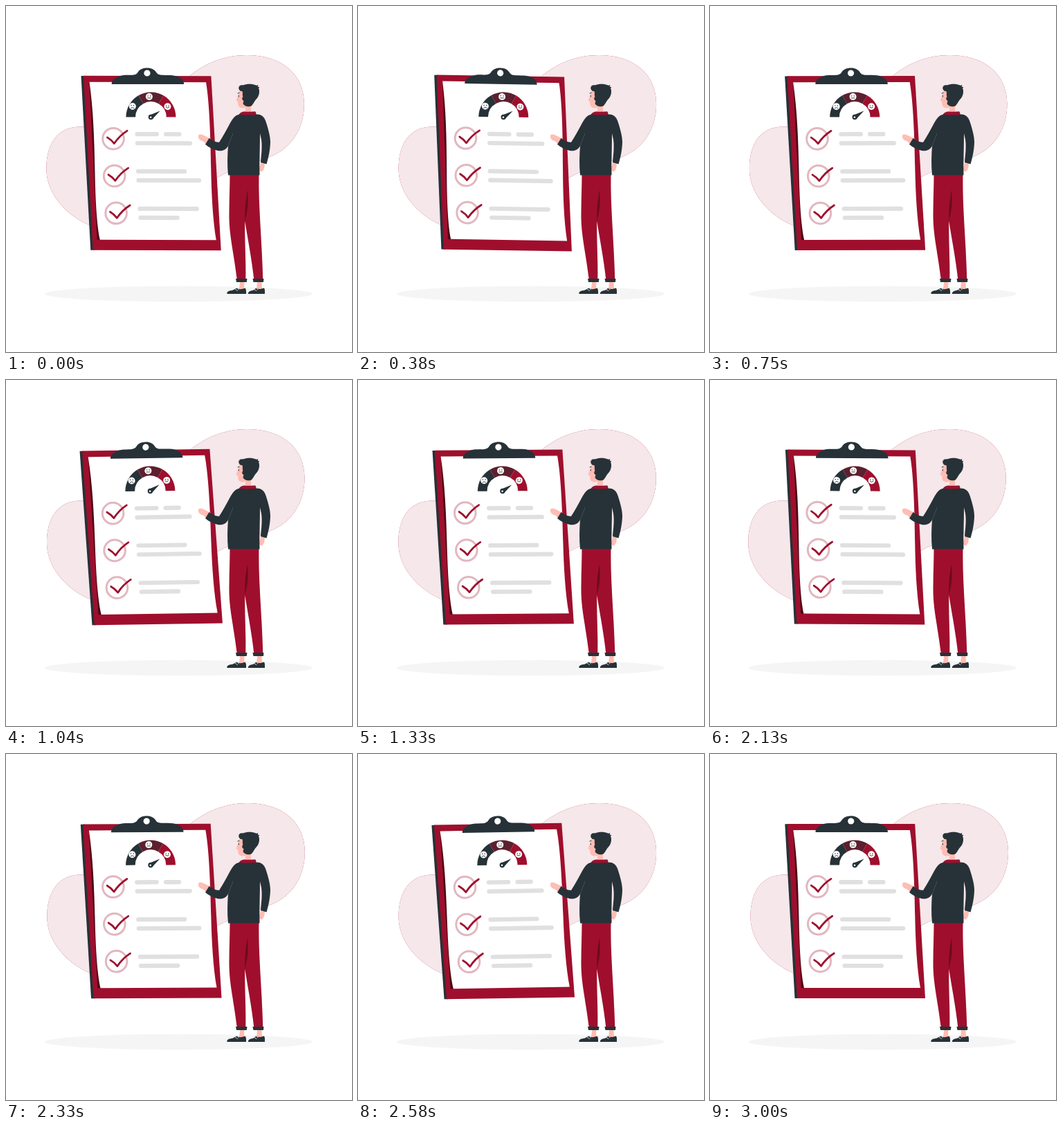
Animation, 500 px wide and 500 px high, one loop 3040 ms. Source, as an HTML page:

```html
<!DOCTYPE html>
<html lang="en">
<head>
<meta charset="utf-8">
<title>Checklist</title>
<style>
  html, body { margin: 0; width: 100%; height: 100%; overflow: hidden; background: #fff; }
  svg { display: block; width: 100vw; height: 100vh; }
  .red { fill: #9f0f2d; }
  .dark { fill: #263238; }
  .skin { fill: #ffbdb3; }
  .line { fill: none; stroke-linecap: round; stroke-linejoin: round; }
</style>
</head>
<body>
<svg viewBox="0 0 500 500">
  <defs>
    <path id="shape" d="M58.5 235C58.5 200 74 174.5 107 174.5C190 175 230 125 262 104C285 84 314 71 348 71C398 71 431 98 431 142C431 178 412 205 384 217C352 230 336 232 305 248C240 282 210 324 150 324C112 322 58.5 285 58.5 235Z"/>
  </defs>

  <g id="blob">
    <use href="#shape" class="red"/>
    <use href="#shape" fill="#fff" opacity=".9"/>
  </g>
  <ellipse cx="249.5" cy="416" rx="193.5" ry="11.3" fill="#f5f5f5"/>

  <g id="board">
    <path class="dark" d="M108.3 101.3H114L128 353H122.5Z"/>
    <path class="red" d="M111.8 101H296.2L311 353H126Z"/>
    <path fill="#4a0715" d="M120.3 110H140V338H131.8Z"/>
    <path fill="#fff" d="M120.3 110H288.8C294 140 295.5 190 296.3 235C297 270 299 310 304 338H136C132 320 129.5 290 128.5 240C127.500 190 126 150 120.300 110Z"/>
    <path class="dark" d="M152.500 113C152 107 159 102 168 100.300C178 99 187 102 190.500 95.500C193 91.500 198 89.500 204 89.500C210 89.500 214.500 92 217 96C220 101 226 99.500 238 100C249 100.500 257 105 257 113Z"/>
    <circle cx="203.7" cy="97" r="4.600" fill="#fff"/>
    <g id="gauge" transform="translate(209.300 160.500)">
      <path class="dark" d="M-2.500 -2.500L13.300 -9L2.500 2.500Z"/>
      <circle class="dark" r="3.700"/>
      <circle cx="-.3" cy=".2" r="1.300" fill="#fff"/>
    </g>
    <g id="rows"></g>
  </g>

  <g id="person">
    <path class="skin" d="M338 399H344.500L344 409H337ZM363 399H369.500L370 409H362Z"/>
    <path class="dark" d="M319.500 416C318.500 413 322 411.500 326 411C330 410.500 331 408 334 407.500C337 410 341 409.500 345.500 407.500C347.500 410 347 413 347 416Z"/>
    <path class="dark" d="M350 416C349.500 413 353 411.500 356.500 411C359 410.500 360 408 362 407.500C365 410 369 409 373 407.500C374.500 410 374 413 374 416Z"/>
    <path class="line" stroke="#fff" stroke-width=".8" d="M331 409L334.500 411.500M333.500 407L336.500 410M358.500 409.500L362 411.500M361.500 407L364 410"/>
    <path class="red" d="M323.500 243H365.500C364.500 290 370 340 371.300 395H358.300C355 365 349 335 345.300 311C344.800 340 347 370 346.300 395H333.800C329 355 322 330 322.500 300C322.500 280 323.500 262 323.500 243Z"/>
    <path fill="#6d0a20" d="M348.800 266C346 282 345 295 345.300 311C347.500 301 351.500 288 348.800 266Z"/>
    <path class="dark" d="M332 394H348.500L347.800 399H333ZM356.500 394H372.500L372 399H357.500Z"/>

    <path class="skin" d="M368 226H374C374 232 373 237 370 239C368 240 366 238 366 235Z"/>
    <path class="skin" d="M296 192L286 187C282 185 278 184.500 278 188C277.500 192 281 194.500 285 195.500L290 200Z"/>
    <path class="skin" d="M338 120L335 130L332.500 136.500L335 138.500C335 144 337 148 342 147.500L346.500 147L345 154C348 156 352 155 354 153V138L352 122Z"/>
    <path class="line" stroke="#263238" stroke-width="1" d="M335 126L337 125.500M336.300 129.500V131"/>
    <path class="red" d="M336.500 159C336.500 155 340 153 344 152.500C350 153.500 355 152 360.500 152.500C362 155 361.500 159 361.500 161Z"/>
    <path class="dark" d="M338 156.500C345 158 354 157.500 361 156.500C368 156 373 159 375.500 167C379 178 382 188 382 197C381.500 210 379 220 376.500 228.500L368 226C369 214 370.500 204 369 193L367 184C367 204 366 225 366.500 244.500H321C319.500 230 320 215 321 202C318 208 313 210 306 209C299 207.500 293 204 288 200L293.500 191C298 194 303 197 308 197C314 188 319 178 324 169C328 162 332 157 338 156.500Z"/>
    <path class="line" stroke="#4c5a60" stroke-width=".7" d="M328 184C326 191 323 196 320.800 203"/>
    <path class="dark" d="M341 123C338 123.500 335.500 120 336.500 117C337.500 114.500 340.500 114 342.500 114.500C348 112 356 112 361 114.500C363 115 364 114.500 364 113.800C364.500 115 364 116 363.500 116.500L366.500 117.300L365 118.500C367 123 366 129 363 133C358 138 357 144 353 145C348 146 344 144 342.500 141L343.500 137C341 136 340.500 133 342.500 131C341 128 343 125 341 123Z"/>
  </g>
</svg>
<script>
const $ = id => document.getElementById(id);
const LOOP = 3040, STEPS = 73;

// Gauge segments and the three faces
const polar = (r, deg) => {
  const a = deg * Math.PI / 180;
  return `${(r * Math.cos(a)).toFixed(2)} ${(-r * Math.sin(a)).toFixed(2)}`;
};
const segment = (from, fill) =>
  `<path fill="${fill}" d="M${polar(36, from)}A36 36 0 0 1 ${polar(36, from - 60)}L${polar(22.3, from - 60)}A22.3 22.3 0 0 0 ${polar(22.3, from)}Z"/>`;
const face = (x, y, bend) =>
  `<g transform="translate(${x} ${y})"><circle r="5" fill="#fff"/>
   <circle class="dark" cx="-1.8" cy="-1.2" r=".75"/><circle class="dark" cx="1.8" cy="-1.2" r=".75"/>
   <path class="line" stroke="#263238" stroke-width=".9" d="M-2.3 ${1.8 - bend / 2}Q0 ${1.8 + bend} 2.3 ${1.8 - bend / 2}"/></g>`;
$('gauge').insertAdjacentHTML('afterbegin',
  segment(180, '#263238') + segment(120, '#5e1f2f') + segment(60, '#9f0f2d') +
  face(-26.6, -15.4, -1.6) + face(-2.6, -29.4, 0) + face(24, -15.2, 1.6));

// Checklist: circle centre, then bars as [x1, x2, y]
const rows = [
  [155, 191.8, [[186.3, 221, 185.2], [228, 253.5, 185.2], [186.7, 269, 198.3]]],
  [156.7, 245.6, [[188, 261.3, 239], [188.5, 282.3, 252]]],
  [159.3, 299.4, [[190.5, 279, 293], [191.5, 251, 306]]]
];
$('rows').innerHTML = rows.map(([x, y, bars]) =>
  `<g class="line" transform="translate(${x} ${y})">
     <circle r="15.3" stroke="#e2b7c0" stroke-width="3"/>
     <path stroke="#9f0f2d" stroke-width="2.8" d="M-8.7 -1.8Q-3 1.500 1.200 7Q9 -4.500 20 -11.400"/></g>` +
  bars.map(([a, b, cy]) =>
    `<rect x="${a}" y="${cy - 3.1}" width="${b - a}" height="6.2" rx="3.1" fill="#e0e0e0"/>`).join('')
).join('');

// Piecewise linear value over evenly spaced keys
const track = (keys, p) => {
  const k = p * (keys.length - 1), i = Math.min(Math.floor(k), keys.length - 2);
  return keys[i] + (keys[i + 1] - keys[i]) * (k - i);
};
const SHAKE = [0, -1, 2, -4, 4, -4, 4, -4, 2, -1, 0];
const SWAY = [0, 1, 0, -1, 0];

function draw(now) {
  const step = Math.floor((now % LOOP) / LOOP * STEPS + 0.25);
  const p = (step + 1) / STEPS % 1;
  $('blob').setAttribute('transform', `translate(${track(SHAKE, p)} 0)`);
  $('board').setAttribute('transform', `rotate(${track(SWAY, p * 2 % 1)} 209.7 221.3)`);
}
const start = performance.now();
const tick = () => {
  draw(performance.now() - start);
  requestAnimationFrame(tick);
};
tick();
</script>
</body>
</html>
```
